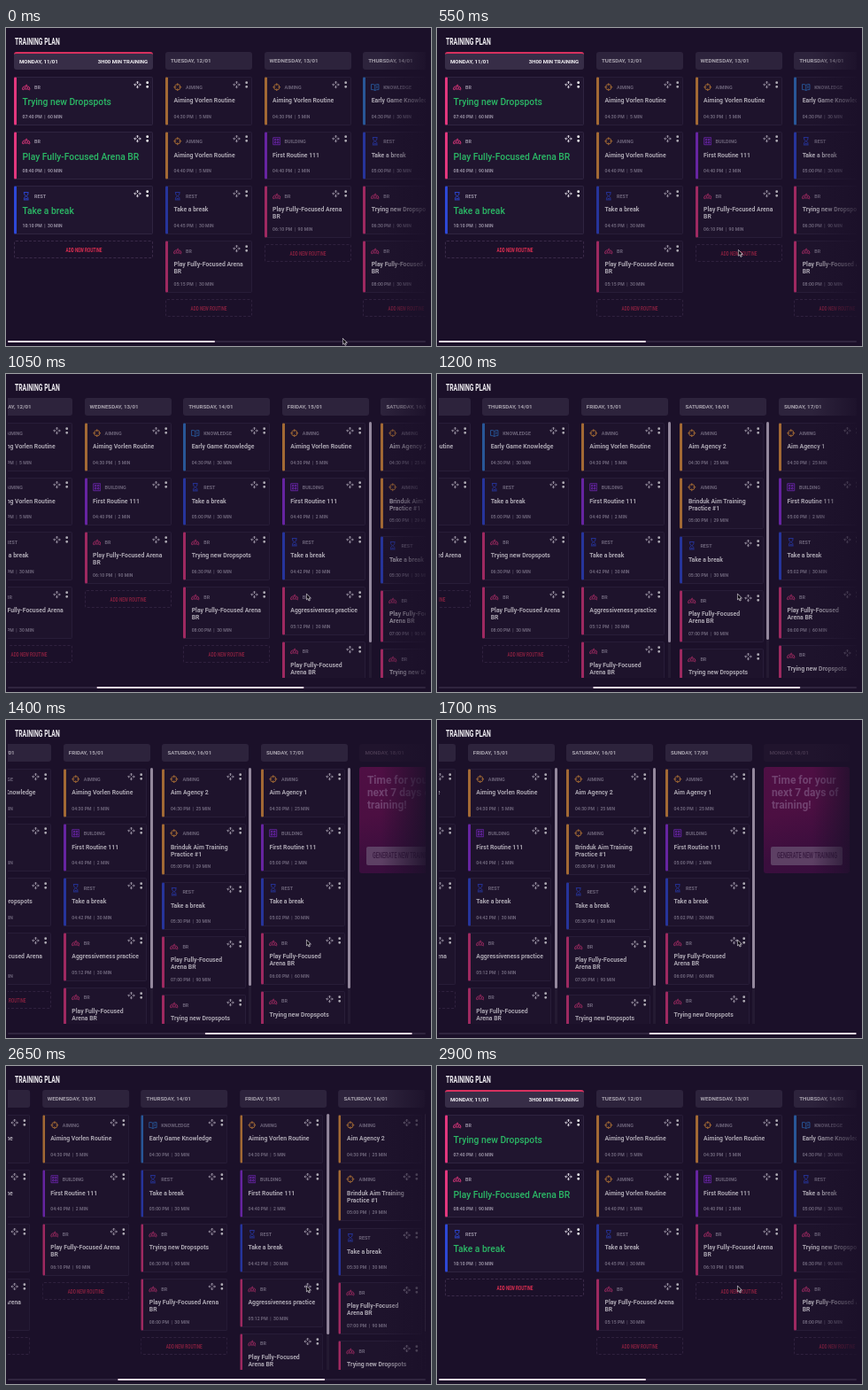
An HTML page for the animation above (2950 ms loop, 480x359 px).

```html
<!DOCTYPE html>
<html lang="en">
<head>
<meta charset="utf-8">
<title>Training plan</title>
<style>
html, body { margin: 0; width: 100%; height: 100%; overflow: hidden; background: #1b1029; }
#stage { position: absolute; left: 0; top: 0; width: 480px; height: 359px; overflow: hidden;
  background: #1b1029; font-family: Roboto, "Liberation Sans", sans-serif; color: #f4f2f6; }
#stage div, #stage svg { position: absolute; box-sizing: border-box; }
.text { white-space: pre; transform: translateY(-50%); line-height: 1.2; }
.narrow { font-weight: 700; transform: translateY(-50%) scaleX(.62); transform-origin: 0 50%; }
.mid { transform: translate(-50%, -50%) scaleX(.62); transform-origin: 50% 50%; }
#view { left: 1.5px; top: 0; width: 472.5px; height: 346px; overflow: hidden; }
#strip { left: -1.5px; top: 0; width: 960px; height: 346px; }
#fade { right: 0; top: 24px; width: 50px; height: 322px;
  background: linear-gradient(90deg, #1b102900, #1b1029dd); }
.day { top: 0; width: 98px; height: 343px; opacity: .66; }
.day.now { width: 157px; opacity: 1; }
.day.next { width: 97px; opacity: 1; }
.head { top: 27px; width: 100%; height: 20px; border-radius: 3px; background: #372d47; }
.now .head { border-top: 2px solid #d8315f; }
.next .head { background: #20142d; }
.date { left: 6px; top: 38px; font-size: 6.2px; font-weight: 600; }
.now .date { font-size: 6.1px; font-weight: 700; }
.total { right: 6px; top: 38px; font-size: 6px; font-weight: 700; }
.list { left: 0; top: 53px; width: 100%; height: 290px; overflow: hidden; }
.card { left: 0; border: 1px solid #2f2440; border-left: 3px solid; border-radius: 2px; background: #20152f; }
.tag { left: 23px; font-size: 5.4px; font-weight: 700; color: #968fa2; }
.name { left: 9.5px; font-size: 6.85px; font-weight: 600; line-height: 8px; transform: none; }
.now .name { font-size: 10.3px; font-weight: 500; line-height: 12px; color: #2bb866; }
.time { left: 9.5px; font-size: 5.1px; font-weight: 600; color: #968fa2; }
.add { left: 0; width: 100%; height: 20px; border: 1px dashed #3a2a49; border-radius: 2px; }
.addText { left: 50%; font-size: 7.5px; color: #d92d50; }
.day:not(.now) .addText { opacity: .8; }
.rail { left: 98px; top: 54px; width: 3px; height: 289px; background: #2a2038; }
.grip { left: 0; top: 0; width: 100%; border-radius: 1.5px; background: #d3c6d9; }
.promo { left: 0; top: 53px; width: 97px; height: 120px; border-radius: 3px; overflow: hidden;
  background: linear-gradient(165deg, #4f0f44 0%, #4c0f42 40%, #3a0e3d 75%, #390e3e 100%); }
.pitch { left: 8.5px; top: 7.5px; font-size: 12px; line-height: 14.3px; font-weight: 700; color: #714270; white-space: pre; }
.button { left: 8px; top: 89.5px; width: 81px; height: 21.5px; border-radius: 2px; background: #5d4064; }
#track { left: 2px; top: 353px; width: 472px; height: 1.8px; border-radius: 1px; background: #30253f; }
#thumb { left: 1.5px; top: 352.5px; width: 234.5px; height: 2.6px; border-radius: 1.3px; background: #f4dcec; }
</style>
</head>
<body>
<div id="stage">
  <div class="text narrow" style="left:10px;top:16.4px;font-size:11px">TRAINING PLAN</div>
  <div id="view"><div id="strip"></div><div id="fade"></div></div>
  <div id="track"></div>
  <div id="thumb"></div>
  <svg id="cursor" width="8" height="10" viewBox="0 0 8 10" style="left:0;top:0">
    <path d="M.6.5V7.4L2.2 6 3.3 8.5 4.6 7.9 3.5 5.5H5.7Z" fill="#0b0710" stroke="#e8e4ea" stroke-width=".7"/>
  </svg>
</div>
<script>
const kinds = {
  BR: ['#e2377d', 'M2.6 4.2H7.4Q9 4.2 9.5 7.6Q9.2 9 7.4 7.3H2.6Q.8 9 .5 7.6Q1 4.2 2.6 4.2ZM5 4V2.4H6.2M3 5.8H4.2M6 5.8H7.2'],
  AIMING: ['#e8983a', 'M1.6 5a3.4 3.4 0 1 0 6.8 0a3.4 3.4 0 1 0-6.8 0M5 .3V3.4M5 6.6V9.7M.3 5H3.4M6.6 5H9.7'],
  REST: ['#2d48d6', 'M2 .6H8M2 9.4H8M2.8 1V3L4.6 5 2.8 7V9M7.2 1V3L5.4 5 7.2 7V9M4 8H6'],
  BUILDING: ['#8d2fe0', 'M.8.8H9.2V9.2H.8ZM2.6 2.6H4.2V4.2H2.6ZM5.8 2.6H7.4V4.2H5.8ZM2.6 5.8H4.2V7.4H2.6ZM5.8 5.8H7.4V7.4H5.8Z'],
  KNOWLEDGE: ['#2f7bd0', 'M5 2.5Q3 1.2.6 1.7V8Q3 7.6 5 9Q7 7.6 9.4 8V1.7Q7 1.2 5 2.5ZM5 2.5V9M6.4 4H8M6.4 5.6H8']
};
const aim = 'Aiming Vorlen Routine', arena = 'Play Fully-Focused Arena\nBR',
  shortArena = 'Play Fully-Focused\nArena BR', drops = 'Trying new Dropspots', rest = 'Take a break';

// Each routine: kind, title, start, minutes
const days = [
  { x: 9, date: 'MONDAY, 11/01', now: true, list: [
    ['BR', drops, '07:40', 60], ['BR', 'Play Fully-Focused Arena BR', '08:40', 90], ['REST', rest, '10:10', 30]] },
  { x: 180, date: 'TUESDAY, 12/01', list: [
    ['AIMING', aim, '04:30', 5], ['AIMING', aim, '04:40', 5], ['REST', rest, '04:45', 30], ['BR', arena, '05:15', 30]] },
  { x: 291.6, date: 'WEDNESDAY, 13/01', list: [
    ['AIMING', aim, '04:30', 5], ['BUILDING', 'First Routine 111', '04:40', 2], ['BR', arena, '06:10', 90]] },
  { x: 403.2, date: 'THURSDAY, 14/01', list: [
    ['KNOWLEDGE', 'Early Game Knowledge', '04:30', 30], ['REST', rest, '05:00', 30],
    ['BR', drops, '06:30', 90], ['BR', arena, '08:00', 30]] },
  { x: 514.8, date: 'FRIDAY, 15/01', grip: 249, list: [
    ['AIMING', aim, '04:30', 5], ['BUILDING', 'First Routine 111', '04:40', 2], ['REST', rest, '04:42', 30],
    ['BR', 'Aggressiveness practice', '05:12', 30], ['BR', shortArena, '05:42', 90]] },
  { x: 626.4, date: 'SATURDAY, 16/01', grip: 246, list: [
    ['AIMING', 'Aim Agency 2', '04:30', 25], ['AIMING', 'Brinduk Aim Training\nPractice #1', '05:00', 29],
    ['REST', rest, '05:30', 30], ['BR', shortArena, '07:00', 90], ['BR', drops, '08:30', 60]] },
  { x: 738, date: 'SUNDAY, 17/01', grip: 249, list: [
    ['AIMING', 'Aim Agency 1', '04:30', 25], ['BUILDING', 'First Routine 111', '05:00', 2],
    ['REST', rest, '05:02', 30], ['BR', shortArena, '06:00', 60], ['BR', drops, '07:00', 60]] }
];

const box = (cls, style, body = '') => `<div class="${cls}" style="${style}">${body}</div>`;
const text = (cls, y, body) => box('text ' + cls, y === null ? '' : `top:${y}px`, body);

function tools(x, y) {
  return `<svg style="left:${x}px;top:${y}px" width="20" height="10" viewBox="0 0 20 10" fill="none" stroke="#d6d0dc" stroke-width="1">
    <path d="M4.5 1.4V4M4.5 6V8.6M.9 5H3.5M5.5 5H8.1M3.2 2.5L4.5 1.2 5.8 2.5M3.2 7.5L4.5 8.8 5.8 7.5M2 3.7L.7 5 2 6.3M7 3.7L8.3 5 7 6.3"/>
    <path d="M15.7 2.7h.01M15.7 7.3h.01" stroke="#fff" stroke-width="2.8" stroke-linecap="round"/></svg>`;
}

function card([kind, title, start, mins], y, width) {
  const [color, path] = kinds[kind];
  const tall = title.includes('\n');
  const height = tall ? 58.6 : 54.5;
  return box('card', `top:${y}px;width:${width}px;height:${height}px;border-left-color:${color}`) +
    `<svg style="left:9px;top:${y + 6.6}px" width="9.5" height="9.5" viewBox="0 0 10 10" fill="none" stroke="${color}" stroke-width="1"><path d="${path}"/></svg>` +
    text('tag', y + 11.5, kind) +
    text('name', y + 23, title) +
    text('time', y + (tall ? 48.6 : 44.6), `${start} PM  |  ${mins} MIN`) +
    tools(width - 22, y + 3.7);
}

function column(d) {
  const width = d.now ? 157 : d.grip ? 94.5 : 98;
  let y = 2, cards = '';
  for (const r of d.list) {
    cards += card(r, y, width);
    y += (r[1].includes('\n') ? 58.6 : 54.5) + 7.2;
  }
  if (!d.grip) cards += box('add', `top:${y}px`) + text('narrow mid addText', y + 10, 'ADD NEW ROUTINE');
  return box('day' + (d.now ? ' now' : ''), `left:${d.x}px`,
    box('head', '') + text('date', null, d.date) +
    (d.now ? text('total', null, '3H00 MIN TRAINING') : '') +
    box('list', '', cards) +
    (d.grip ? box('rail', '', box('grip', `height:${d.grip}px`)) : ''));
}

const promo = box('day next', 'left:849.4px',
  box('head', '') + box('text date', 'color:#46374f', 'MONDAY, 18/01') +
  box('promo', '',
    box('pitch', '', 'Time for your\nnext 7 days of\ntraining!') +
    box('button', '') +
    box('text narrow mid', 'left:48.5px;top:100.4px;font-size:9px;color:#3a1c42', 'GENERATE NEW TRAINING')));

const find = id => document.getElementById(id);
const strip = find('strip'), thumb = find('thumb'), cursor = find('cursor');
strip.innerHTML = days.map(column).join('') + promo;

const LOOP = 2950, STEP = 50, END = 480;
const swipe = [[650, 0], [750, 4], [850, 26], [950, 98], [1050, 203], [1200, 352],
  [1300, 415], [1400, 450], [1500, 468], [1600, 476], [1700, END]];
const clamp = v => Math.min(1, Math.max(0, v));

function follow(points, t) {
  const i = points.findIndex(p => p[0] > t);
  if (i < 0) return points[points.length - 1][1];
  if (!i) return points[0][1];
  const [t0, a] = points[i - 1], [t1, b] = points[i];
  return a + (b - a) * (t - t0) / (t1 - t0);
}

// The return swipe speeds up until it hits the left end.
function scrollAt(t) {
  if (t < 2300) return follow(swipe, t);
  return (END - .5) * (1 - clamp((t - 2300) / 485) ** 2.27);
}

function draw(time) {
  const t = Math.floor(time % LOOP / STEP) * STEP;
  const x = scrollAt(t);
  const p = clamp((t - 50) / 550), ease = p * p * (3 - 2 * p);
  strip.style.transform = `translateX(${-x}px)`;
  thumb.style.transform = `translateX(${x * .495}px)`;
  cursor.style.transform = `translate(${379.7 - 41 * ease}px, ${349.8 - 102.3 * ease}px)`;
}

const start = performance.now();
function tick() {
  draw(performance.now() - start);
  requestAnimationFrame(tick);
}
tick();
</script>
</body>
</html>
```
